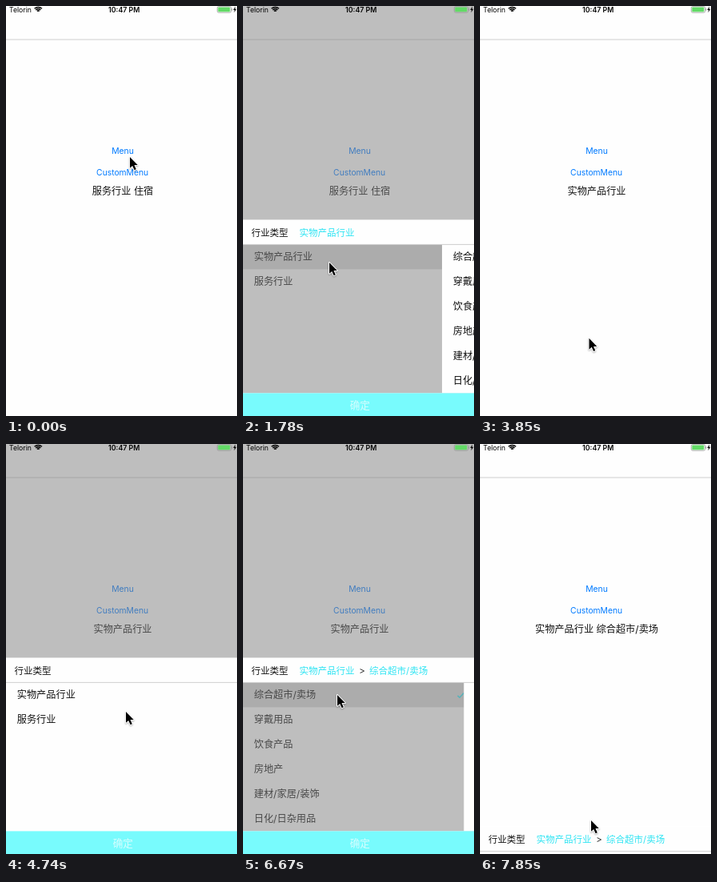
Write an HTML page with a canvas that moves like this. It is 289x513 px and loops after 8 s.

```html
<!DOCTYPE html>
<html lang="zh-CN">
<head>
<meta charset="utf-8">
<title>Cascading menu</title>
<style>
  html, body { margin: 0; width: 100%; height: 100%; overflow: hidden; background: #fff; }
  canvas { display: block; width: 289px; height: 513px; }
</style>
</head>
<body>
<canvas id="stage"></canvas>
<script>
const W = 289, H = 513, LOOP = 8000, STEPS = 54, TICK = LOOP / STEPS;
const SHEET_H = 245.6, BAR = 31, ROW = 31, BODY = 186, FOOT = BAR + BODY;
const SLIDE = 290, TRAVEL = 450, LEAD = 120;
const CJK = 'Inter, "Noto Sans CJK SC", "Noto Sans CJK", sans-serif';
const LATIN = 'Inter, "Liberation Sans", sans-serif';
const PAPER = '#fefefe', INK = '#111', BLUE = '#007aff', CYAN = '#2fe4f3', AQUA = '#78fbfd';
const VEIL = 'rgba(128,128,128,.5)';

const GOODS = '实物产品行业', SERVICE = '服务行业', MARKET = '综合超市/卖场';
const PAGES = [
  [GOODS, SERVICE],
  [MARKET, '穿戴用品', '饮食产品', '房地产', '建材/家居/装饰', '日化/日杂用品'],
  []
];

// The whole story: the pointer reaches each spot shortly before its action.
const stop = (at, x, y, act) => ({ at, x, y, act });
const STORY = [
  stop(410, 149, 184),
  stop(560, 149, 184, 'open'),
  stop(1710, 108, 321, 'push'),
  stop(2340, 114, 335),
  stop(3270, 132, 499, 'close'),
  stop(4270, 149, 185, 'open'),
  stop(4860, 150, 335),
  stop(5310, 108, 358),
  stop(5873, 143, 323, 'push'),
  stop(6630, 118, 314, 'push'),
  stop(7630, 137, 496, 'close'),
  stop(7820, 139, 471)
];

const canvas = document.getElementById('stage');
const g = canvas.getContext('2d');
const dpr = window.devicePixelRatio || 1;
canvas.width = Math.round(W * dpr);
canvas.height = Math.round(H * dpr);

const clamp = v => Math.max(0, Math.min(1, v));
const ease = u => { u = clamp(u); return u * u * (3 - 2 * u); };

function rect(x, y, w, h, color) {
  g.fillStyle = color;
  g.fillRect(x, y, w, h);
}

function pill(x, y, w, h, r) {
  g.beginPath();
  g.roundRect(x, y, w, h, r);
}

function text(s, x, cy, size, color, { font = CJK, weight = 400, align = 'left' } = {}) {
  g.font = `${weight} ${size}px ${font}`;
  g.textAlign = align;
  g.fillStyle = color;
  g.fillText(s, x, cy + size * 0.37);
}

function poly(points, close) {
  g.beginPath();
  points.forEach(([x, y]) => g.lineTo(x, y));
  if (close) g.closePath();
}

function stroke(color, width) {
  g.strokeStyle = color;
  g.lineWidth = width;
  g.stroke();
}

function fill(color) {
  g.fillStyle = color;
  g.fill();
}

function drawHome(label) {
  rect(0, 0, W, H, PAPER);
  rect(0, 41.5, W, 1, '#d0d0d0');
  const mid = { font: LATIN, align: 'center' };
  text('Menu', 146, 181.4, 10.4, BLUE, mid);
  text('CustomMenu', 145.6, 208.3, 10.3, BLUE, mid);
  text(label, 146, 231.6, 12.2, INK, { align: 'center' });
}

function drawStatus() {
  text('Telorin', 4, 4.6, 8.7, '#000', { font: LATIN });
  text('10:47 PM', 147.7, 4.6, 8.8, '#000', { font: LATIN, weight: 600, align: 'center' });
  for (let r = 2; r < 8; r += 2.3) {
    g.beginPath();
    g.arc(40.3, 8, r, -Math.PI * 0.75, -Math.PI * 0.25);
    stroke('#000', 1.5);
  }
  pill(264.3, 0.6, 17.4, 7.6, 1.8);
  stroke('#999', 0.8);
  pill(265.3, 1.6, 15, 5.6, 0.8);
  fill('#62da66');
  rect(282.2, 3.1, 1, 2.6, '#999');
  poly([[287, 0.5], [284.3, 5], [286, 5], [285.3, 8.3], [288.3, 3.7], [286.5, 3.7]], true);
  fill('#000');
}

function drawPage(n, x, y, picked, lit) {
  rect(x, y, W, BODY, PAPER);
  if (lit) rect(x, y, W, ROW, '#d9d9d9');
  PAGES[n].forEach((s, i) => text(s, x + 13.7, y + ROW * (i + 0.5), 12.2, INK));
  if (picked) {
    const cy = y + ROW / 2;
    poly([[x + 268.5, cy + 1], [x + 271, cy + 3.4], [x + 276.3, cy - 2.3]]);
    stroke(CYAN, 1.5);
  }
}

function drawHeader(top, depth) {
  const cy = top + 16;
  text('行业类型', 10.5, cy, 11.5, INK);
  if (depth > 0) text(GOODS, 70.4, cy, 11.5, CYAN);
  if (depth > 1) {
    text('>', 149, cy, 11.5, '#333', { align: 'center' });
    text(MARKET, 158, cy, 11.5, CYAN);
  }
}

function drawSheet(t, top, pushes) {
  const depth = pushes.filter(p => t >= p).length;
  const since = depth ? t - pushes[depth - 1] : Infinity;
  const body = top + BAR;

  rect(0, top, W, SHEET_H + 1, PAPER);
  drawHeader(top, depth);
  if (since < SLIDE) {
    drawPage(depth - 1, 0, body, true, since < 180);
    rect(0, body, W, BODY, VEIL);
    drawPage(depth, W * (1 - ease(since / SLIDE)), body);
  } else {
    const tapped = t > pushes[depth] - 100;
    drawPage(depth, 0, body, tapped, tapped);
  }
  rect(0, top + BAR - 0.5, W, 1, '#d0d0d0');
  rect(0, top + FOOT, W, H - FOOT, AQUA);
  text('确定', 146.3, top + FOOT + 14.8, 12.6, '#d6fdfe', { weight: 300, align: 'center' });
}

function drawPointer(t) {
  let x = 155, y = 189, last = 0;
  for (const s of STORY) {
    const arrive = s.at - LEAD;
    const span = Math.min(TRAVEL, arrive - last);
    const u = ease((t - arrive) / span + 1);
    x += (s.x - x) * u;
    y += (s.y - y) * u;
    last = arrive;
  }
  g.save();
  g.translate(x, y);
  poly([[0, 0], [0, 13.8], [3.2, 10.9], [5.6, 16.2], [7.8, 15.2], [5.5, 10.1], [9.8, 10.1]], true);
  g.lineJoin = 'round';
  g.shadowColor = 'rgba(0,0,0,.3)';
  g.shadowBlur = 2 * dpr;
  g.shadowOffsetY = dpr;
  stroke('#fff', 2);
  g.shadowColor = 'transparent';
  fill('#000');
  g.restore();
}

const times = act => STORY.filter(s => s.act === act).map(s => s.at);
const OPENS = times('open'), PUSHES = times('push'), CLOSES = times('close');
const LABELS = ['服务行业 住宿', GOODS, `${GOODS} ${MARKET}`];

function draw(t) {
  g.setTransform(dpr, 0, 0, dpr, 0, 0);
  drawHome(LABELS[CLOSES.filter(c => t >= c).length]);

  OPENS.forEach((open, i) => {
    const close = CLOSES[i];
    if (t < open || t >= close + SLIDE) return;
    if (t < close) {
      g.globalAlpha = clamp((t - open) / 100);
      rect(0, 0, W, H, VEIL);
      g.globalAlpha = 1;
    }
    const shown = ease((t - open) / SLIDE) - ease((t - close) / SLIDE);
    drawSheet(t, H - SHEET_H * shown, PUSHES.filter(p => p > open && p < close));
  });
  drawStatus();
  drawPointer(t);
}

// The screen refreshes in even steps.
const start = performance.now();
function frame() {
  const t = (performance.now() - start) % LOOP;
  draw(Math.min(STEPS - 1, Math.floor((t + 9) / TICK)) * TICK);
  requestAnimationFrame(frame);
}
frame();
</script>
</body>
</html>
```
